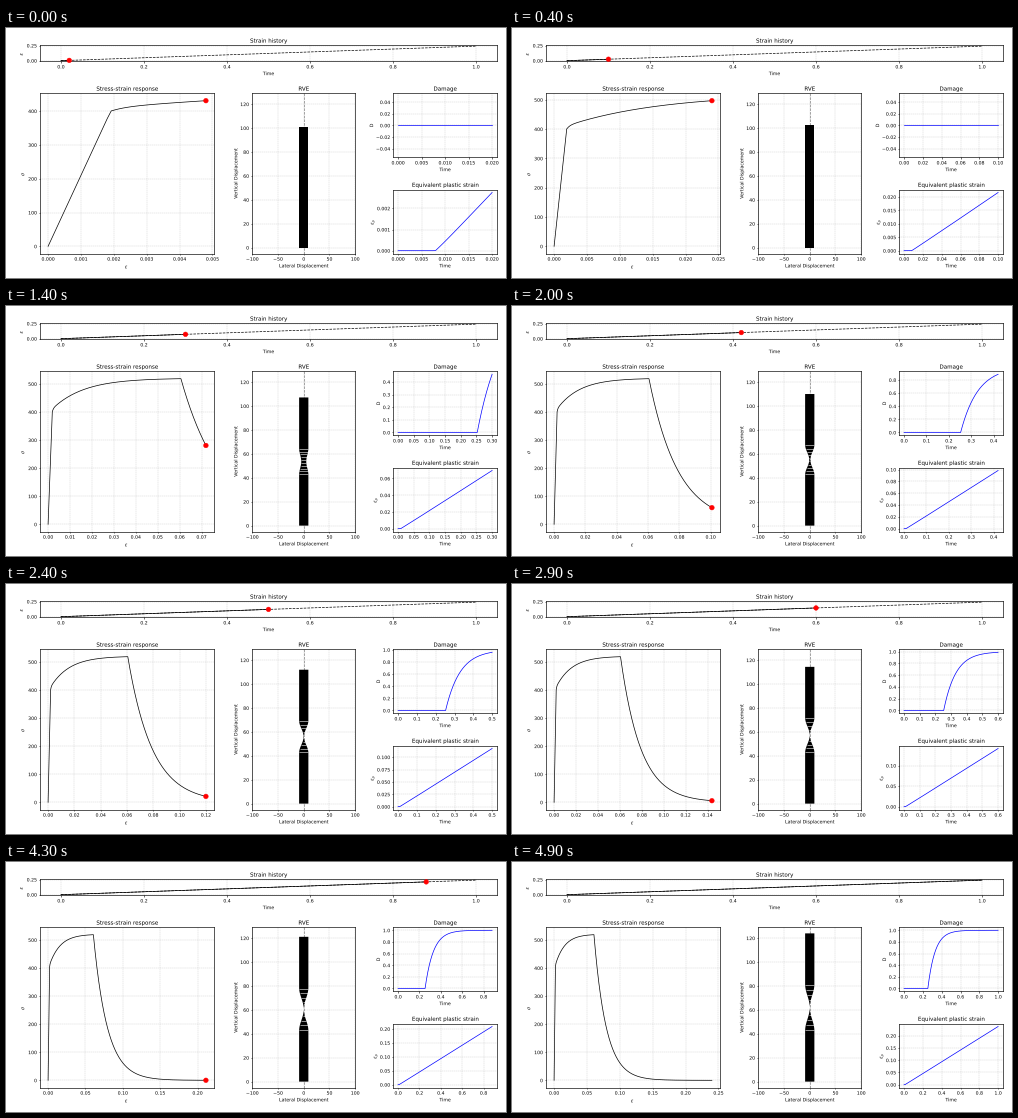
A matplotlib script that plays this animation: 500x250 px, repeating every 5 s.

```python
import numpy as np
import matplotlib.pyplot as plt
from matplotlib.animation import FuncAnimation
from matplotlib.collections import LineCollection
from matplotlib.patches import Polygon
from matplotlib.patheffects import Normal

W, H = 500, 250
FRAMES, STEPS = 50, 40          # load steps per frame
E, YIELD = 210e3, 400.0
MAX_STRAIN, ONSET, DECAY = 0.24, 0.0606, 54.0
HEIGHT, HALF_WIDTH = 100.0, 9.0

plt.rcParams.update({
    "font.family": "DejaVu Sans",
    "text.hinting": "none",
    "path.effects": [Normal()],   # text as outlines, at sub-pixel positions
    "axes.linewidth": 1.4,
    "xtick.major.width": 1.2,
    "ytick.major.width": 1.2,
})


def hardening(p):
    return (YIELD + 11.5 * (1 - np.exp(-2500 * p))
            + 109 * (1 - np.exp(-71 * p)))


# Strain-driven response: elastic, saturating hardening, exponential damage
time = np.linspace(0, 1, FRAMES * STEPS + 1)
strain = MAX_STRAIN * time
p_grid = np.linspace(0, 0.25, 50001)
plastic = np.interp(strain, p_grid + hardening(p_grid) / E, p_grid)
damage = 1 - np.exp(-DECAY * np.maximum(strain - ONSET, 0))
stress = (1 - damage) * E * (strain - plastic)

fig = plt.figure(figsize=(15, 7.5), dpi=100 / 3, facecolor="white")


def panel(left, top, right, bottom, title, xlabel, ylabel, ypad=4):
    ax = fig.add_axes([left / W, 1 - bottom / H,
                       (right - left) / W, (bottom - top) / H])
    ax.set_title(title)
    ax.set_xlabel(xlabel)
    ax.set_ylabel(ylabel, labelpad=ypad)
    ax.grid(True, ls="--", color="#b0b0b0", lw=0.8, alpha=0.75)
    ax.set_axisbelow(True)
    return ax


ax_hist = panel(34.2, 17.4, 490.8, 33.4, "Strain history", "Time",
                r"$\varepsilon$")
ax_stress = panel(34.2, 65.4, 207.8, 225.6, "Stress-strain response",
                  r"$\varepsilon$", r"$\sigma$")
ax_rve = panel(246.3, 65.4, 349.2, 225.6, "RVE", "Lateral Displacement",
               "Vertical Displacement")
ax_damage = panel(387.4, 65.4, 490.8, 129.4, "Damage", "Time", "D")
ax_plastic = panel(387.4, 161.6, 490.8, 225.6, "Equivalent plastic strain",
                   "Time", r"$\varepsilon_p$", ypad=0)

ax_hist.plot(time, strain, "k--")
curves = [
    (ax_hist, ax_hist.plot([], [], "k-")[0], time, strain),
    (ax_stress, ax_stress.plot([], [], "k-")[0], strain, stress),
    (ax_damage, ax_damage.plot([], [], "b-")[0], time, damage),
    (ax_plastic, ax_plastic.plot([], [], "b-")[0], time, plastic),
]
dot_style = dict(ms=10, clip_on=False, zorder=5)
dots = [
    (ax_hist.plot([], [], "ro", **dot_style)[0], time, strain),
    (ax_stress.plot([], [], "ro", **dot_style)[0], strain, stress),
]

ax_rve.set_xlim(-100, 100)
ax_rve.set_ylim(-5, HEIGHT * (1 + MAX_STRAIN) + 5)
ax_rve.axvline(0, color="gray", ls="--", lw=1.5)
bar = Polygon(np.zeros((4, 2)), closed=True, fc="black", ec="none", zorder=3)
ax_rve.add_patch(bar)
gaps = LineCollection([], colors="white", linewidths=1.2, zorder=4)
ax_rve.add_collection(gaps, autolim=False)


def draw_bar(eps, d):
    """Uniform stretch up to the onset, then only the middle fifth elongates."""
    shoulder = 0.4 * HEIGHT * (1 + min(eps, ONSET))
    top = HEIGHT * (1 + eps)
    half = top / 2 - shoulder

    def width(s):
        return HALF_WIDTH * (1 - d * np.cos(np.pi * s / 2) ** 2)

    s = np.linspace(-1, 1, 61)
    y = np.concatenate([[0], top / 2 + half * s, [top]])
    x = np.concatenate([[HALF_WIDTH], width(s), [HALF_WIDTH]])
    bar.set_xy(np.column_stack([np.r_[x, -x[::-1]], np.r_[y, y[::-1]]]))
    rows = np.linspace(-0.95, 0.95, 10) if d > 0 else []
    gaps.set_segments([[(-width(r), top / 2 + half * r),
                        (width(r), top / 2 + half * r)] for r in rows])


def update(frame):
    i = (frame + 1) * STEPS
    for ax, line, x, y in curves:
        line.set_data(x[:i + 1], y[:i + 1])
    for dot, x, y in dots:
        dot.set_data([x[i]], [y[i]])
        dot.set_visible(frame < FRAMES - 1)
    for ax, *_ in curves:
        ax.relim()
        ax.autoscale_view()
    draw_bar(strain[i], damage[i])
    return []


anim = FuncAnimation(fig, update, frames=FRAMES, interval=100,
                     init_func=lambda: update(0), repeat=True, repeat_delay=0)
plt.show()
```
